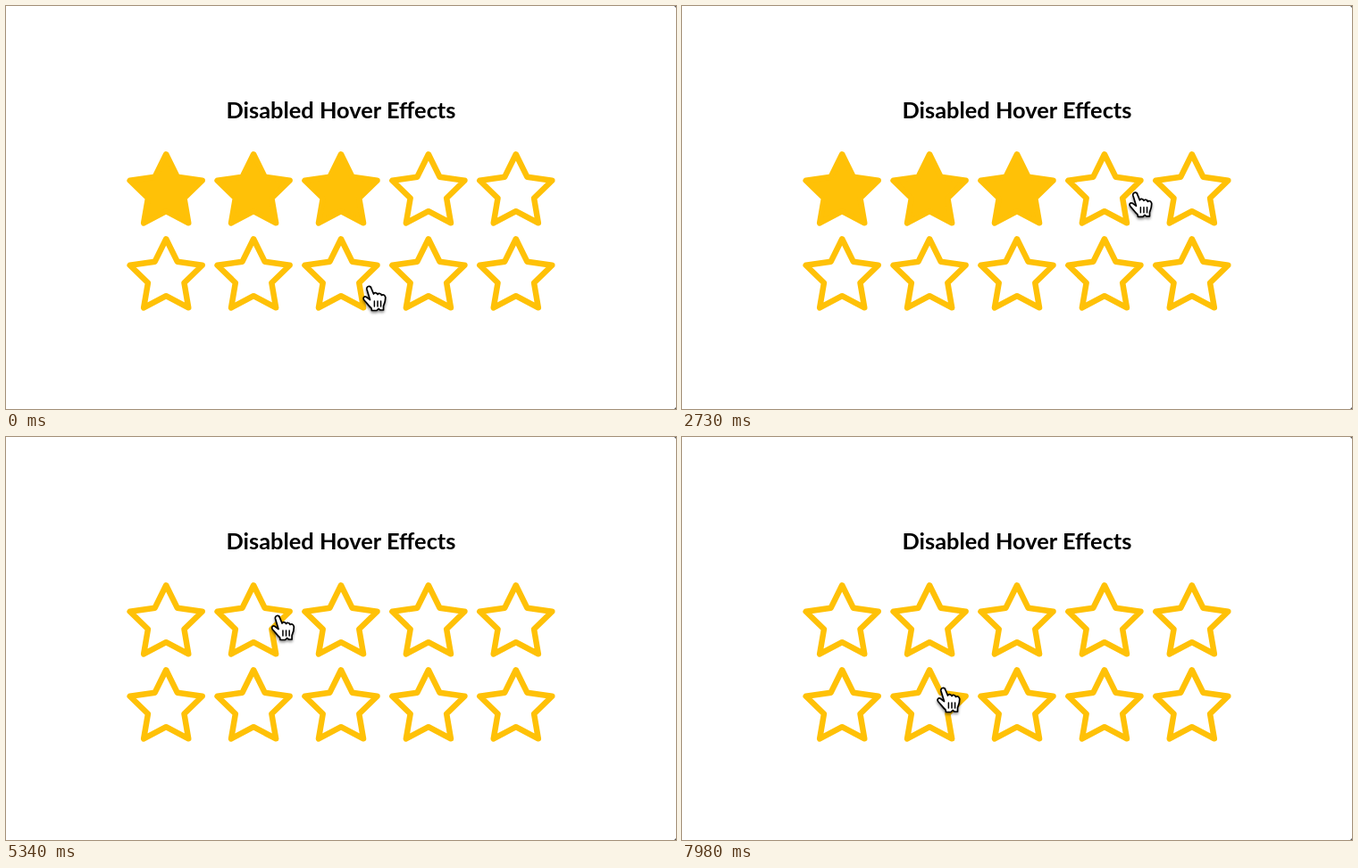
An HTML page for the animation above (8 s loop, 750 by 452 pixels).

```html
<!DOCTYPE html>
<html lang="en">
<head>
<meta charset="utf-8">
<title>Disabled Hover Effects</title>
<style>
  html, body { margin: 0; height: 100%; overflow: hidden; background: #fff; }
  svg { display: block; width: 100%; height: 100%; }
  .title { font: 700 25.4px Lato, "Open Sans", sans-serif; text-anchor: middle; }
  .star { stroke: #ffc107; stroke-width: 6.5; stroke-linejoin: round; }
  .shadow { filter: drop-shadow(0 2px 1.5px rgba(0, 0, 0, .45)); }
</style>
</head>
<body>
<svg viewBox="0 0 750 452">
  <rect width="750" height="452" fill="#fff"/>
  <path d="M748 0h2v2zM750 450v2h-2z" fill="#555"/>
  <text class="title" x="375" y="126">Disabled Hover Effects</text>
  <g id="stars"></g>
  <circle id="ring" cy="-6" r="56" fill="none" stroke="#000" stroke-width="2"/>
  <g id="hand" class="shadow" stroke="#000" stroke-linecap="round" stroke-linejoin="round">
    <path fill="#fff" stroke-width="1.7" d="M5 5C4 1 9 0 10 4L12.5 10C13 8 16 8 17 10.5C18 9 21 9 21.3 11.5C23 10 25 11 25.7 13.5C26 18 25 20 23.5 23.5V28H20L18 26.5L16 28.5H10.5L10 26C7 23.5 5 20 2 17C0 14.5 2 12 4.5 13.5L8.5 16.5Z"/>
    <path fill="none" stroke-width="1.5" d="M13.4 18v6m3.6 -6v6m3.6 -6v6"/>
  </g>
</svg>
<script>
const LOOP = 8000, STEP = 30, PRESS = 90;
const COLUMN = 97.9, ROW = 95, RADIUS = 42.6;
const FIRST = { x: 179.2, y: 208.9 };
const $ = id => document.getElementById(id);

// Each move eases the cursor to x, y between start and end; it rests otherwise
const home = [399, 313];
const moves = [
  [20, 480, 559, 303],
  [1300, 1620, 135, 288], [1620, 2170, 606, 300], [2170, 2600, 590, 208],
  [2600, 3060, 127, 207], [3060, 3260, 409, 208], [3260, 3360, 347, 203],
  [3945, 4170, 183, 210], [4170, 4600, 618, 250], [4600, 4890, 583, 199],
  [5055, 5480, 199, 199], [5480, 5900, 584, 211],
  [6855, 7380, 193, 199],
  [7905, 7980, 285, 280]
];
const clicks = [630, 960, 3540, 6270, 6540, 7410, 7650];

const smooth = u => u * u * (3 - 2 * u);

function cursorAt(t) {
  let [x, y] = home;
  for (const [start, end, toX, toY] of moves) {
    if (t <= start) break;
    const k = smooth(Math.min(1, (t - start) / (end - start)));
    x += (toX - x) * k;
    y += (toY - y) * k;
  }
  return [x, y];
}

function starPoints(cx, cy) {
  return Array.from({ length: 10 }, (_, i) => {
    const angle = i * Math.PI / 5, r = i % 2 ? RADIUS / 2 : RADIUS;
    return `${cx + r * Math.sin(angle)},${cy - r * Math.cos(angle)}`;
  }).join(" ");
}

function addStar(row, column) {
  const el = document.createElementNS("http://www.w3.org/2000/svg", "polygon");
  el.setAttribute("class", "star");
  el.setAttribute("points", starPoints(FIRST.x + column * COLUMN, FIRST.y + row * ROW));
  return $("stars").appendChild(el);
}

const rows = [0, 1].map(row =>
  Array.from({ length: 5 }, (_, column) => addStar(row, column)));

// A click rates up to the star under the fingertip; the same star again clears the row
function ratingsAt(t) {
  const ratings = [3, 0];
  for (const press of clicks) {
    if (t < press + PRESS / 2) break;
    const [x, y] = cursorAt(press);
    const row = Math.round((y - FIRST.y) / ROW);
    const star = Math.round((x + 8 - FIRST.x) / COLUMN) + 1;
    ratings[row] = ratings[row] === star ? 0 : star;
  }
  return ratings;
}

function draw(t) {
  const place = `translate(${cursorAt(t)})`;
  const ratings = ratingsAt(t);
  const press = clicks.find(c => t >= c && t < c + PRESS);
  rows.forEach((stars, row) => stars.forEach((star, i) =>
    star.setAttribute("fill", i < ratings[row] ? "#ffc107" : "none")));
  $("hand").setAttribute("transform", place);
  $("ring").setAttribute("transform", place);
  $("ring").setAttribute("opacity", press ? 0.4 * (1 - (t - press) / PRESS) : 0);
}

function tick() {
  const t = performance.now() % LOOP;
  draw(Math.floor(t / STEP) * STEP);
  requestAnimationFrame(tick);
}
tick();
</script>
</body>
</html>
```
